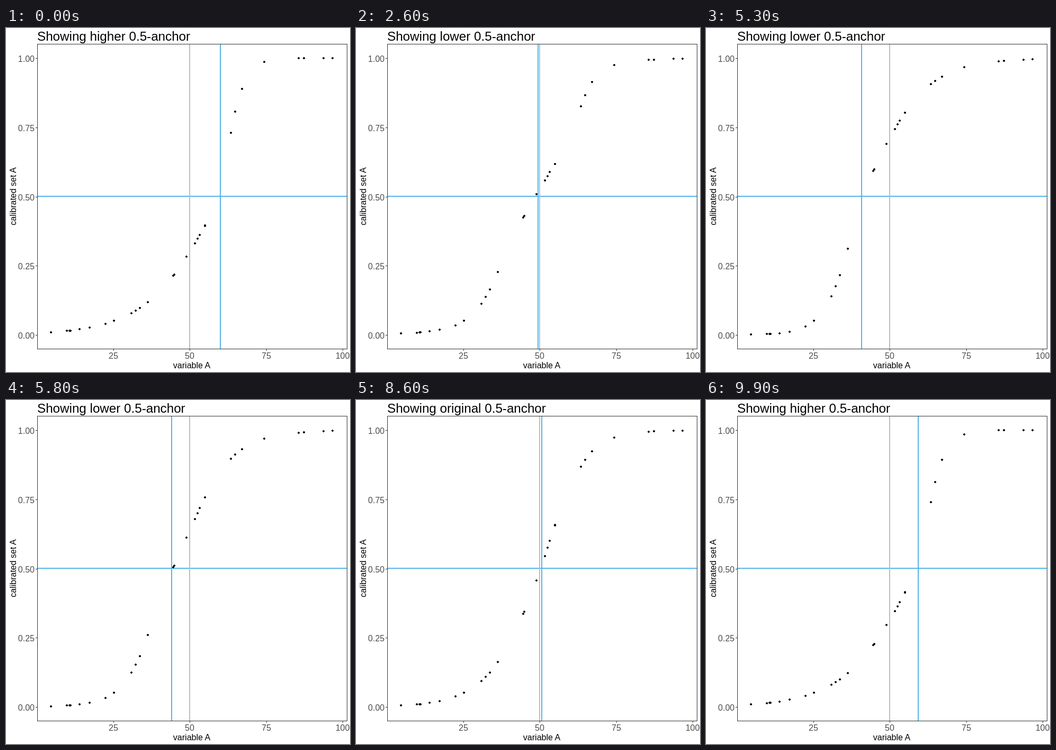
These frames come from a looping animation (650x650 px, 10 s). An HTML page:

```html
<!DOCTYPE html>
<html lang="en">
<head>
<meta charset="utf-8">
<title>Calibration anchors</title>
<style>
  html, body { margin: 0; width: 100%; height: 100%; overflow: hidden; background: #fff; }
  svg { display: block; width: 650px; height: 650px; font: 16px "Liberation Sans", Arial, sans-serif; }
  .crisp { shape-rendering: crispEdges; }
  .blue { fill: #56b4e9; }
  .grey { fill: #bebebe; }
  .tick { fill: #333; }
  .label { fill: #4d4d4d; }
  .mid { text-anchor: middle; }
  .end { text-anchor: end; }
  #title { font-size: 24.2px; }
</style>
</head>
<body>
<svg viewBox="0 0 650 650">
  <g class="crisp">
    <rect class="blue" x="60" y="317" width="584" height="2"/>
    <rect class="blue" id="anchor" x="404" y="31" width="2" height="575"/>
    <rect class="grey" x="346" y="31" width="2" height="575"/>
    <g id="points"></g>
    <rect x="59.5" y="30.5" width="585" height="576" fill="none" stroke="#333"/>
  </g>
  <g id="axes"></g>
  <text id="title" x="59" y="24"></text>
  <text class="mid" x="351" y="643">variable A</text>
  <text class="mid" transform="translate(19 318) rotate(-90)">calibrated set A</text>
</svg>
<script>
const $ = id => document.getElementById(id);
const add = (parent, tag, attrs, text = '') => {
  const el = document.createElementNS('http://www.w3.org/2000/svg', tag);
  for (const k in attrs) el.setAttribute(k, attrs[k]);
  el.textContent = text;
  return parent.appendChild(el);
};

const X = v => Math.round(347.47 + (v - 50) * 5.773);
const Y = v => Math.round(580 - v * 523);
const mix = (a, b, p) => a + (b - a) * p;

const values = [
  4.56, 9.76, 10.63, 10.97, 13.92, 17.2, 22.4, 25.17, 30.85, 32.27, 33.63, 36.23,
  44.56, 44.84, 48.96, 51.62, 52.5, 53.26, 54.92, 54.98,
  63.38, 64.85, 67.1, 74.4, 85.63, 87.36, 93.77, 96.72
];

// Logistic calibration: 0.05 at 25, 0.5 at the crossover, 0.95 at 70
const calibrate = (v, cross) => {
  const span = v < cross ? cross - 25 : 70 - cross;
  return 1 / (1 + Math.exp(-Math.log(19) * (v - cross) / span));
};

// start: last tick (100 ms) before each state begins to change
const states = [
  { name: 'higher', cross: 60, start: 18 },
  { name: 'lower', cross: 40, start: 52 },
  { name: 'original', cross: 50, start: 85 }
];
const STEPS = 15;

for (const v of [0, 0.25, 0.5, 0.75, 1]) {
  const y = Y(v);
  add($('axes'), 'rect', { class: 'tick crisp', x: 56, y, width: 3, height: 1 });
  add($('axes'), 'text', { class: 'label end', x: 54, y: y + 7 }, v.toFixed(2));
}
for (const v of [25, 50, 75, 100]) {
  const x = X(v);
  add($('axes'), 'rect', { class: 'tick crisp', x, y: 607, width: 1, height: 3 });
  add($('axes'), 'text', { class: 'label mid', x, y: 625 }, v);
}

const dots = values.map(() => add($('points'), 'path', { d: 'M-1-2h2v1h1v2h-1v1h-2v-1h-1v-2h1z' }));

function draw(tick) {
  let i = states.findIndex(s => tick <= s.start + STEPS);
  if (i < 0) i = 0;
  const from = states[i], to = states[(i + 1) % states.length];
  const p = Math.max(0, tick - from.start) / STEPS;
  $('title').textContent = `Showing ${(p < 0.5 ? from : to).name} 0.5-anchor`;
  $('anchor').setAttribute('x', X(mix(from.cross, to.cross, p)) - 1);
  dots.forEach((dot, n) => {
    const v = values[n];
    const y = Y(mix(calibrate(v, from.cross), calibrate(v, to.cross), p));
    dot.setAttribute('transform', `translate(${X(v)} ${y})`);
  });
}

const begin = performance.now();
let last = -1;
function loop() {
  const tick = Math.floor((performance.now() - begin) / 100) % 100;
  if (tick !== last) draw(last = tick);
  requestAnimationFrame(loop);
}
loop();
</script>
</body>
</html>
```
